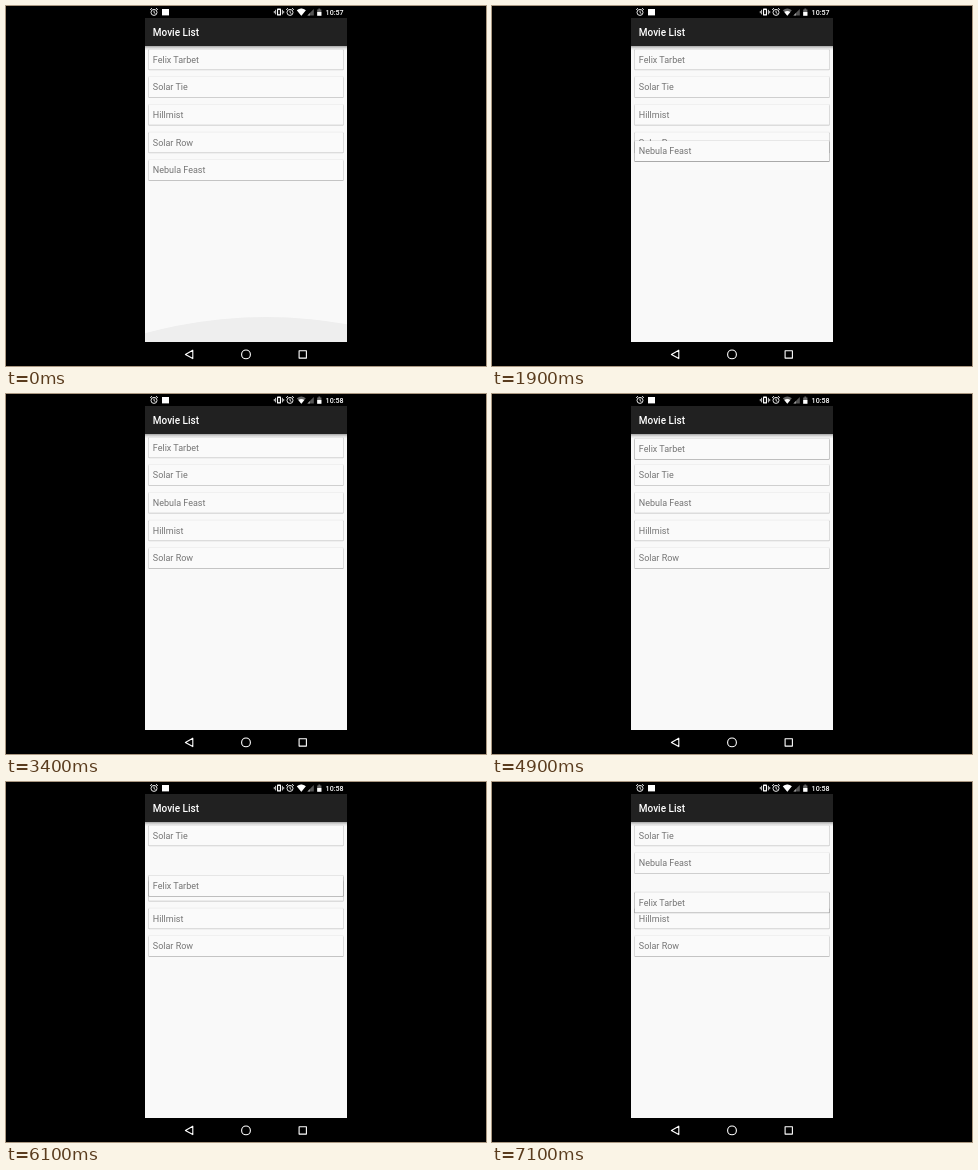
These frames come from a looping animation (480x360 px, 7.2 s). An HTML page:

```html
<!DOCTYPE html>
<html lang="en">
<head>
<meta charset="utf-8">
<title>Movie List</title>
<style>
  html, body { margin: 0; width: 100%; height: 100%; overflow: hidden; background: #000; }
  svg { display: block; width: 480px; height: 360px; font-family: Roboto, Arial, sans-serif; }
</style>
</head>
<body>
<svg viewBox="0 0 480 360">
  <defs>
    <clipPath id="content"><rect x="139" y="40" width="202" height="296"/></clipPath>
    <linearGradient id="barShadow" x2="0" y2="1">
      <stop offset="0" stop-opacity=".34"/>
      <stop offset=".5" stop-opacity=".1"/>
      <stop offset="1" stop-opacity="0"/>
    </linearGradient>
    <g id="alarm" fill="none" stroke="#fff" stroke-width=".9">
      <circle cy=".4" r="3"/>
      <path d="M0-1.4V.6L1.4 1.5M-3.9-2.2L-2-3.8M3.9-2.2L2-3.8"/>
    </g>
  </defs>

  <rect width="480" height="360"/>
  <rect x="139" y="40" width="202" height="296" fill="#f9f9f9"/>
  <g clip-path="url(#content)">
    <circle id="glow" cx="260" cy="768" r="457" fill="#eee"/>
    <g id="list"></g>
    <rect x="139" y="40" width="202" height="4.5" fill="url(#barShadow)"/>
  </g>

  <rect x="139" y="12" width="202" height="28" fill="#212121"/>
  <text x="146.8" y="29.6" font-size="10" font-weight="500" fill="#fff">Movie List</text>

  <use href="#alarm" x="148" y="6"/>
  <rect x="156" y="3" width="7" height="6.4" fill="#fff"/>
  <g fill="#fff">
    <rect x="271" y="2.6" width="4" height="7" rx=".6"/>
    <path d="M269.6 3.8v4.6M276.4 3.8v4.6M268.3 5v2.2M277.7 5v2.2" stroke="#fff" stroke-width=".8"/>
    <rect x="272" y="4" width="2" height="4.2" fill="#222"/>
  </g>
  <use href="#alarm" x="284" y="6"/>
  <path d="M290.8 4.2Q295.3 1 299.8 4.2L295.3 9.8Z" fill="#666"/>
  <path id="wifi" fill="#fff"/>
  <path d="M301.4 9.6L307.8 3V9.6Z" fill="#555"/>
  <path d="M301.4 9.6L304 7V9.6Z" fill="#999"/>
  <path d="M311.2 3.4H312.4V2.5H314.2V3.4H315.4V9.7H311.2Z" fill="#666"/>
  <path d="M311.2 6H315.4V9.7H311.2Z" fill="#fff"/>
  <text id="clock" x="319.6" y="8.8" font-size="7.1" font-weight="500" fill="#fff"></text>

  <g fill="none" stroke="#fff" stroke-width="1.1" stroke-linejoin="round">
    <path d="M179.4 348.4L186.8 344.2V352.6Z"/>
    <circle cx="240" cy="348.4" r="4.4"/>
    <rect x="293.1" y="344.8" width="7.3" height="7.3"/>
  </g>
</svg>
<script>
const LOOP = 7200, STEP = 100;
const TOP = 43.2, PITCH = 27.67, SHIFT_MS = 250;
const titles = ["Felix Tarbet", "Solar Tie", "Hillmist", "Solar Row", "Nebula Feast"];

// Finger offset of the held card as [time, dy].
const drags = [
  { card: 4, start: 1400, drop: 3100, path: [[1400, 0], [1500, -2], [1900, -19], [2100, -22.5],
    [2200, -27], [2300, -34], [2600, -53.4], [2900, -54.8], [3000, -56.2], [3100, -56.2], [3400, -55.34]] },
  { card: 0, start: 4800, drop: LOOP, path: [[4800, 0], [4900, 1.5], [5500, 20], [5600, 23],
    [6100, 50.5], [6300, 54], [6400, 57], [6700, 71], [6800, 71], [7100, 67]] }
];

// Neighbours slide by one row once the held card has passed them.
const shifts = [
  { card: 3, at: 2200, rows: 1 }, { card: 2, at: 2950, rows: 1 },
  { card: 1, at: 5680, rows: -1 }, { card: 4, at: 6370, rows: -1 }
];

const clamp = v => Math.max(0, Math.min(1, v));
const ease = v => (1 - Math.cos(Math.PI * clamp(v))) / 2;
const byId = id => document.getElementById(id);

function make(tag, attrs, parent) {
  const node = document.createElementNS("http://www.w3.org/2000/svg", tag);
  for (const key in attrs) node.setAttribute(key, attrs[key]);
  return parent.appendChild(node);
}

const list = byId("list");
const cards = titles.map(title => {
  const group = make("g", {}, list);
  const box = (x, y, w, h, fill, opacity = 1) =>
    make("rect", { x, y, width: w, height: h, rx: .6, fill, "fill-opacity": opacity }, group);
  const halo = box(142.2, -.5, 195.6, 21.4, "#000");
  const shade = box(142.5, .5, 195, 20.5, "#000");
  box(142.9, 0, 194.2, 20.2, "#fafafa");
  make("text", { x: 146.8, y: 13.5, "font-size": 9, fill: "#757575" }, group).textContent = title;
  return { group, halo, shade };
});

function sample(path, t) {
  if (t <= path[0][0]) return path[0][1];
  for (let i = 1; i < path.length; i++) {
    const [t0, v0] = path[i - 1], [t1, v1] = path[i];
    if (t <= t1) return v0 + (v1 - v0) * (t - t0) / (t1 - t0);
  }
  return path[path.length - 1][1];
}

function render(time) {
  const t = Math.floor((time % LOOP) / STEP) * STEP;
  const held = t < 4800 ? 4 : 0;

  cards.forEach((card, i) => {
    let y = TOP + i * PITCH, lift = 0;
    for (const s of shifts)
      if (s.card === i) y += s.rows * PITCH * ease((t - s.at) / SHIFT_MS);
    for (const d of drags) {
      if (d.card !== i) continue;
      y += sample(d.path, t);
      lift += clamp((t - d.start + STEP) / 200) * (1 - clamp((t - d.drop) / 300));
    }
    card.group.setAttribute("transform", `translate(0 ${y.toFixed(2)})`);
    card.halo.setAttribute("fill-opacity", .07 + .08 * lift);
    card.shade.setAttribute("fill-opacity", .17 + .07 * lift);
  });
  if (list.lastChild !== cards[held].group) {
    cards.forEach((card, i) => i !== held && list.appendChild(card.group));
    list.appendChild(cards[held].group);
  }

  const strong = t < 400 || t >= 5200;
  byId("wifi").setAttribute("d", strong
    ? "M290.8 4.2Q295.3 1 299.8 4.2L295.3 9.8Z"
    : "M292.3 6Q295.3 4 298.3 6L295.3 9.8Z");
  byId("glow").setAttribute("visibility", t < 400 ? "visible" : "hidden");
  byId("clock").textContent = t < 2400 ? "10:57" : "10:58";
}

const begin = performance.now();
function tick() {
  render(performance.now() - begin);
  requestAnimationFrame(tick);
}
tick();
</script>
</body>
</html>
```
